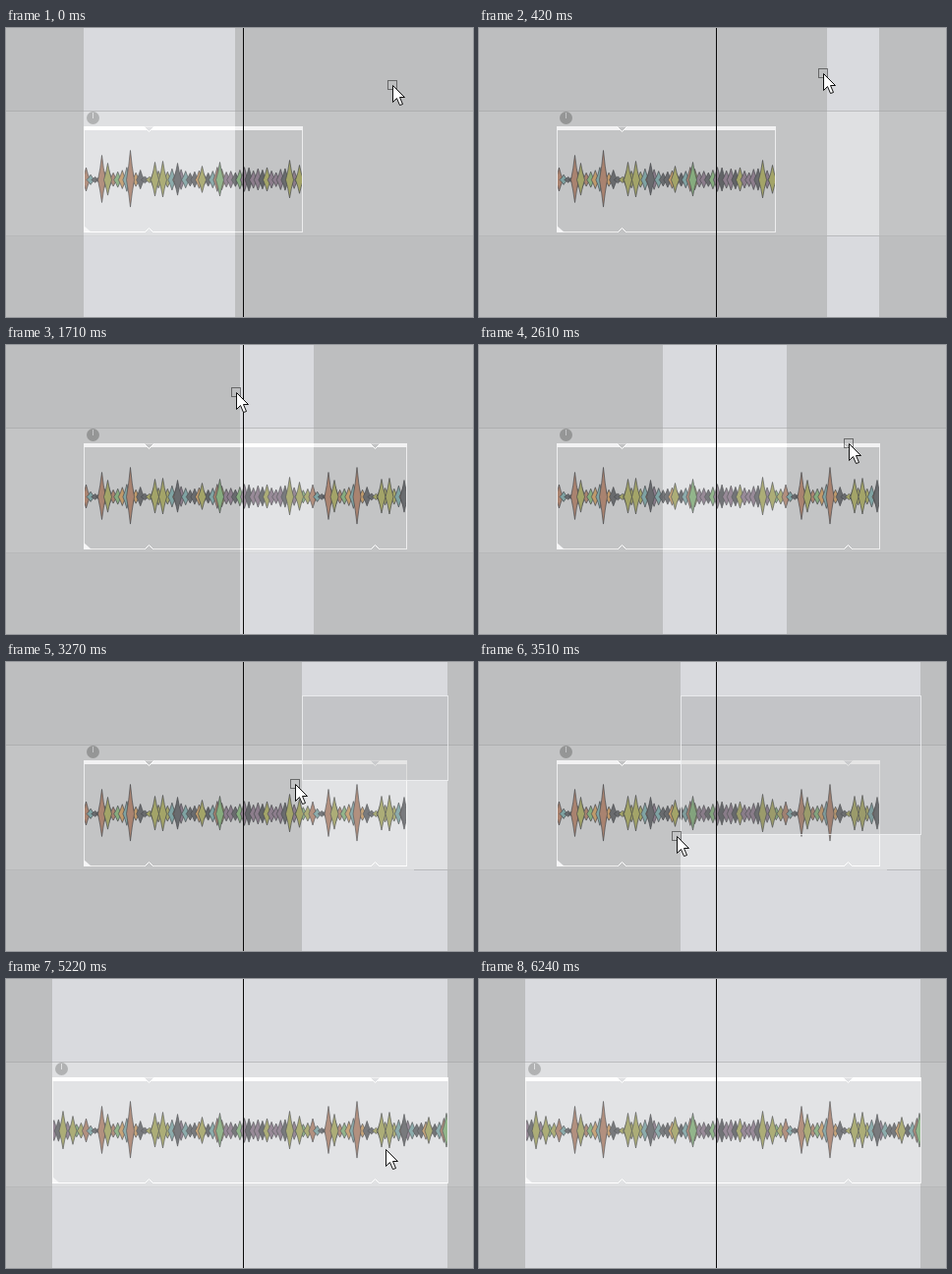
These frames come from a looping animation (475x294 px, 6.39 s). An HTML page with a canvas:

```html
<!DOCTYPE html>
<html>
<head>
<meta charset="utf-8">
<title>Clip editing</title>
<style>
  html, body { margin: 0; width: 100%; height: 100%; overflow: hidden; background: #bdbebf; }
  canvas { display: block; }
</style>
</head>
<body>
<canvas id="stage" width="475" height="294"></canvas>
<script>
const W = 475, H = 294, LOOP = 6390, PERIOD = 230.5, MID = 154.5;
const ctx = document.getElementById('stage').getContext('2d');

// Pointer stops: time, x, y
const path = [
  [0, 393, 58], [120, 407, 44], [270, 396, 45], [820, 261, 49], [960, 264, 173],
  [1080, 264, 174], [1470, 313, 47], [1950, 187, 49], [2220, 197, 187], [2610, 376, 100],
  [2910, 449, 36], [3030, 449, 35], [3510, 201, 177], [4050, 54, 233], [4180, 41, 228],
  [4320, 41, 228], [4950, 335, 104], [5220, 386, 173], [5490, 386, 181], [5850, 331, 236],
  [6240, 445, 296], [LOOP, 445, 320]
];

const noise = n => { const s = Math.sin(n * 12.9898) * 43758.5453; return s - Math.floor(s); };

// Audio of one loop: seeded small lobes, fading out at two pauses, plus a few accents
const tints = ['#696b6e', '#626467', '#a98370', '#a3a468', '#86ac7e', '#c09a6b', '#8c7d8c', '#7fa3a3'];
const lobes = [];
for (let x = 81, i = 1; x < 307; x += 4.6, i++) {
  const fade = Math.min(1, Math.abs(x - 92) / 8, Math.abs(x - 143) / 9);
  lobes.push({ x, height: 1 + (5 + 7 * noise(i)) * fade, tint: tints[Math.floor(noise(i + 99) * 8)] });
}
for (const [x, height, tint] of [[97, 25, 2], [103, 17, 3], [126, 30, 2], [151, 18, 3], [159, 19, 3],
  [174, 17, 0], [199, 14, 3], [217, 18, 4], [288, 20, 3], [298, 15, 3]]) {
  lobes.push({ x, height, tint: tints[tint] });
}

function rect(x, y, w, h, color) {
  ctx.fillStyle = color;
  ctx.fillRect(x, y, w, h);
}

function shape(points, fill, stroke, closed = true) {
  ctx.beginPath();
  points.forEach(([x, y]) => ctx.lineTo(x, y));
  if (closed) ctx.closePath();
  if (fill) { ctx.fillStyle = fill; ctx.fill(); }
  if (stroke) { ctx.strokeStyle = stroke; ctx.stroke(); }
}

function dottedBox(x, y, w, h) {
  ctx.setLineDash([1, 1]);
  ctx.strokeStyle = '#111';
  ctx.strokeRect(x + 0.5, y + 0.5, w, h);
  ctx.setLineDash([]);
}

const legAt = t => Math.max(1, path.findIndex(stop => stop[0] > t));

// The screen refreshes in equal steps of about 130 ms between two stops.
function refreshTime(now) {
  const leg = legAt(now), start = path[leg - 1][0], span = path[leg][0] - start;
  const step = span / Math.round(span / 130);
  return start + Math.floor((now - start) / step) * step;
}

function pointerAt(t) {
  const leg = legAt(t);
  const [t0, x0, y0] = path[leg - 1], [t1, x1, y1] = path[leg];
  const k = (t - t0) / (t1 - t0), eased = k * (1.5 - 0.5 * k);
  return { x: Math.round(x0 + (x1 - x0) * eased), y: Math.round(y0 + (y1 - y0) * eased) };
}

function selectionAt(t, x) {
  if (t < 270) return [79, 233];
  if (t < 1470) return [t < 820 ? x : 261, 407];
  if (t < 3030) return [t < 1950 ? x : 187, 313];
  return [t < 4180 ? x : 47, 449];
}

function drawLanes([a, b], left, right) {
  rect(0, 0, W, H, '#bdbebf');
  rect(0, 85, W, 126, '#c3c4c5');
  rect(a, 0, b - a, H, '#d9dade');
  rect(a, 85, b - a, 126, '#dfe0e2');
  rect(0, 84, W, 1, '#aeafb0');
  rect(a, 84, b - a, 1, '#bbbcbe');
  rect(0, 211, W, 1, '#b7b8b9');
  rect(a, 211, b - a, 1, '#b9babc');
  const from = Math.max(a, left - 8), to = Math.min(b, right + 8);
  if (to > from) rect(from, 211, to - from, 1, '#d5d6d8');
}

function drawWave(left, right) {
  ctx.save();
  ctx.beginPath();
  ctx.rect(left + 1, 104, right - left - 1, 100);
  ctx.clip();
  ctx.lineWidth = 0.7;
  ctx.strokeStyle = '#494b4e';
  for (let shift = -PERIOD; shift <= PERIOD; shift += PERIOD) {
    for (const { x, height, tint } of lobes) {
      const c = x + shift + 0.5;
      ctx.beginPath();
      ctx.moveTo(c - 4, MID);
      ctx.quadraticCurveTo(c - 1.5, MID - height * 0.45, c, MID - height);
      ctx.quadraticCurveTo(c + 1.5, MID - height * 0.45, c + 4, MID);
      ctx.quadraticCurveTo(c + 1.5, MID + height * 0.45, c, MID + height * 0.92);
      ctx.quadraticCurveTo(c - 1.5, MID + height * 0.45, c - 4, MID);
      ctx.fillStyle = tint;
      ctx.fill();
      ctx.stroke();
    }
  }
  ctx.restore();
}

function drawClip(left, right, [a, b]) {
  const inside = x => x >= a && x < b;
  const width = right - left + 1, edge = 'rgba(255,255,255,.7)';
  drawWave(left, right);
  rect(left, 100, width, 4, '#f2f2f3');
  rect(left, 207, width, 1, edge);
  rect(left, 104, 1, 103, edge);
  rect(right, 104, 1, 103, edge);
  shape([[left, 201], [left + 8, 208], [left, 208]], '#f6f6f7');

  const from = Math.max(a, left), to = Math.min(b, right + 1);
  if (to > from) {
    rect(from, 100, to - from, 4, '#fff');
    rect(from, 104, to - from, 103, 'rgba(255,255,255,.1)');
    rect(from, 207, to - from, 1, '#fff');
  }

  // Loop boundary notches
  for (const x of [145.5, 375.5]) {
    if (x > right) continue;
    const fill = inside(x) ? '#e1e2e4' : '#c3c4c5';
    shape([[x - 5, 100.5], [x, 105.5], [x + 5, 100.5]], fill, '#fff', false);
    rect(x - 3.5, 207, 7, 1, fill);
    shape([[x - 4, 207.5], [x, 203.5], [x + 4, 207.5]], null, '#fff', false);
  }

  // Gain knob
  const lit = inside(left + 9);
  ctx.beginPath();
  ctx.arc(left + 9.5, 91.5, 6.5, 0, 7);
  ctx.fillStyle = lit ? '#b1b2b3' : '#959696';
  ctx.fill();
  rect(left + 9, 86, 1, 6, lit ? '#dfe0e1' : '#c3c4c5');
}

function drawMarquee(x, y) {
  rect(x, 34, 450 - x, y - 34, 'rgba(0,0,0,.1)');
  ctx.strokeStyle = 'rgba(240,241,242,.85)';
  ctx.strokeRect(x + 0.5, 34.5, 449 - x, y - 34);
}

function drawPointer(t, { x, y }) {
  const copying = (t >= 960 && t < 1200) || (t >= 2080 && t < 2340);
  const overClip = t >= 4320 && y > 104 && y < 208;
  if (copying) dottedBox(x + 2, y + 16, 12, 8);
  else if (!overClip) dottedBox(x - 5, y - 5, 9, 9);

  const outline = [[0, 0], [0, 17], [4, 13], [7, 20], [10, 19], [7, 12], [12, 12]];
  shape(outline.map(([dx, dy]) => [x + dx + 0.5, y + dy + 0.5]), '#fff', '#111');
  if (copying) {
    rect(x + 10, y + 20, 11, 11, '#111');
    rect(x + 11, y + 21, 9, 9, '#fff');
    rect(x + 13, y + 25, 5, 1, '#111');
    rect(x + 15, y + 23, 1, 5, '#111');
  }
}

function draw() {
  const t = refreshTime((performance.now() + 1) % LOOP);
  const drag = pointerAt(Math.max(0, t - 14)); // a drag trails the pointer a little
  const selection = selectionAt(t, drag.x);
  const left = t < 4320 ? 79 : 47;
  const right = t < 1080 ? 301 : t < 4320 ? 407 : 449;

  ctx.lineWidth = 1;
  drawLanes(selection, left, right);
  drawClip(left, right, selection);
  if (t > 3030 && t < 4180) drawMarquee(selection[0], drag.y);
  rect(241, 0, 1, H, '#0a0a0a');
  if (t < 6240) drawPointer(t, pointerAt(t));
  requestAnimationFrame(draw);
}
draw();
</script>
</body>
</html>
```
